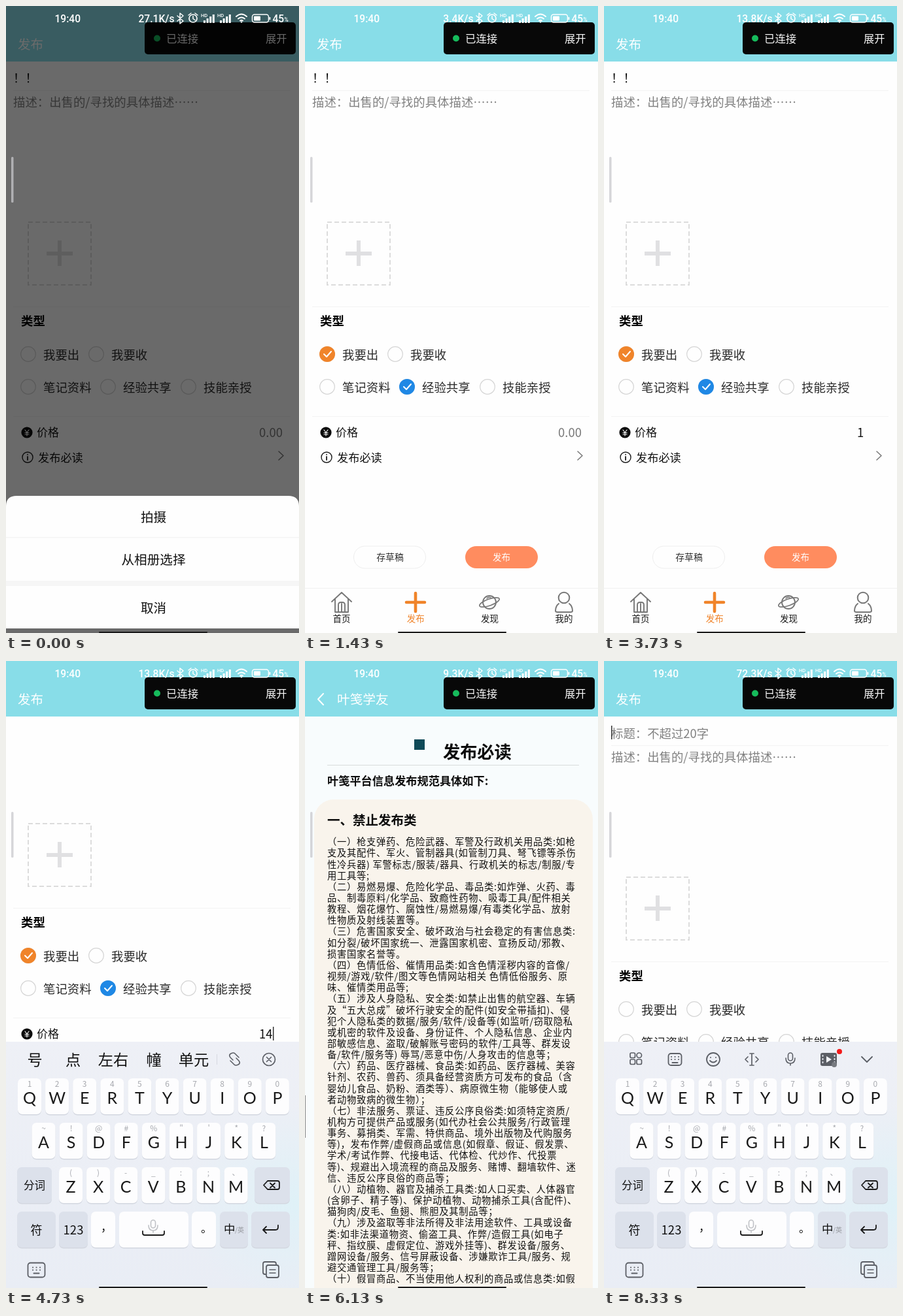
These frames come from a looping animation (448x960 px, 8.36 s). An HTML page:

```html
<!DOCTYPE html>
<html lang="zh-CN">
<head>
<meta charset="utf-8">
<style>
html, body { margin: 0; width: 100%; height: 100%; overflow: hidden; background: #fefefe; }
svg { display: block; width: 100%; height: 100%; font-family: "Noto Sans CJK SC", "Noto Sans CJK", sans-serif; }
text { white-space: pre; }
.line { fill: none; stroke-linecap: round; stroke-linejoin: round; }
.status text { font-family: Roboto, sans-serif; font-weight: 500; }
.letter { font-family: Lato, sans-serif; }
</style>
</head>
<body>
<svg id="stage" viewBox="0 0 448 960" lang="zh-CN"></svg>
<script>
const LOOP = 8360, PAPER = '#fefefe', CYAN = '#88dde8', ORANGE = '#f0842a', GRAY = '#777', HINT = '#808080', DARK = '#1a1a1a';

// Drawing helpers; text is placed by its vertical centre
const text = (s, x, cy, size, fill = '#111', more = '') =>
  `<text x="${x}" y="${(cy + size * .37).toFixed(2)}" font-size="${size}" fill="${fill}" ${more}>${s}</text>`;
const mid = (s, x, cy, size, fill, more = '') => text(s, x, cy, size, fill, 'text-anchor="middle" ' + more);
const rect = (x, y, w, h, fill, r = 0, more = '') =>
  `<rect x="${x}" y="${y}" width="${w}" height="${h}" rx="${r}" fill="${fill}" ${more}/>`;
const disc = (x, y, r, fill, more = '') => `<circle cx="${x}" cy="${y}" r="${r}" fill="${fill}" ${more}/>`;
const ring = (x, y, r, stroke, w = 1.6) => disc(x, y, r, 'none', `stroke="${stroke}" stroke-width="${w}"`);
const path = (d, stroke, w = 1.6, more = '') => `<path class="line" d="${d}" stroke="${stroke}" stroke-width="${w}" ${more}/>`;
const group = (id, body, more = '') => `<g id="${id}" ${more}>${body}</g>`;
const bold = 'font-weight="700"';

const radio = (x, y, label) => ring(x, y, 11.3, '#d4d4d4', 1.2) + text(label, x + 23, y + 1, 18.4, '#2a2a2a');
const tick = (id, x, y, fill) => group(id, disc(x, y, 12, fill) + path(`M${x - 5} ${y}l4 4 7-8`, '#fff', 2));
const rule = y => rect(11, y, 424, 1, '#f3f3f3');

function form() {
  return group('heading', text('！！', 11, 110, 18.4)) +
    group('blank', text('标题：不超过20字', 11, 111, 18.4, HINT)) +
    rect(11, 99, 1.5, 21, '#333', 0, 'id="titleCaret"') + rule(129) +
    text('描述：出售的/寻找的具体描述……', 11, 147, 18.4, HINT) +
    rect(34, 331, 96, 96, 'none', 0, 'stroke="#dcdcdc" stroke-width="2" stroke-dasharray="7 4"') +
    rect(62, 376, 40, 6, '#e0e0e2') + rect(79, 359, 6, 39, '#e0e0e2') + rule(460) +
    text('类型', 23, 482, 18.4, '#000', bold) +
    radio(34, 533, '我要出') + radio(138, 533, '我要收') +
    radio(34, 583, '笔记资料') + radio(156, 583, '经验共享') + radio(279, 583, '技能亲授') +
    tick('sell', 34, 533, ORANGE) + tick('share', 156, 583, '#1f88e5') + rule(628) +
    disc(32, 653, 8.6, '#0c0c0c') + path('M29 649l3 4 3-4M32 653v5M29 653.5h6M29 656h6', '#fff', 1.1) +
    text('价格', 47, 653, 17) + text('0.00', 387, 653, 18.5, GRAY, 'id="price"') +
    rect(408, 642, 1.5, 21, '#333', 0, 'id="priceCaret"') +
    ring(33, 691, 8, DARK, 1.4) + path('M33 690v5M33 686.6v.2', DARK, 1.8) +
    text('发布必读', 49, 692, 17.2) + path('M417 682l7 6.5-7 6.5', GRAY, 1.5) +
    rect(74.5, 827, 110, 34, PAPER, 17, 'stroke="#eee"') + mid('存草稿', 130, 844, 13.9, '#333') +
    rect(245, 827, 111, 34, '#ff8c5f', 17) + mid('发布', 300.5, 844, 13.5, '#fff');
}

function tabs() {
  return rect(0, 891, 448, 69, PAPER) + rect(0, 891, 448, 1, '#f0f0f0') +
    path('M41 912l15-14 15 14M46 908v20h20v-20M51 928v-11q0-4 4-4h2q4 0 4 4v11M56 915v13', GRAY, 1.9) +
    path('M169 899v28M155 913h28', ORANGE, 4.6) +
    ring(282, 913, 10, GRAY, 1.9) +
    `<ellipse cx="282" cy="913" rx="16" ry="5" transform="rotate(-20 282 913)" fill="none" stroke="${GRAY}" stroke-width="1.7"/>` +
    path('M278 907q3-3 6-1', GRAY, 1.4) +
    ring(396, 906, 8.3, GRAY, 2) + path('M388 915q-5 4-5 11 0 2 3 2h20q3 0 3-2 0-7-5-11', GRAY, 2) +
    ['首页', '发布', '发现', '我的'].map((s, i) => mid(s, 56 + i * 113.3, 938, 13.5, i === 1 ? ORANGE : DARK)).join('');
}

function keyboard() {
  const ink = '#5c5f66';
  const key = (x, y, w, special) => rect(x, y + 1.5, w, 55, '#d3d7e0', 7) + rect(x, y, w, 55, special ? '#dce1eb' : '#fdfdfe', 7);
  const row = (letters, hints, x, y) => [...letters].map((c, i) => {
    const cx = x + i * 42.1;
    return key(cx - 18, y, 36) + mid(hints[i], cx, y + 9, 12, '#a6a8ae') + mid(c, cx, y + 30, 25, DARK, 'class="letter"');
  }).join('');
  const mic = (x, y, c) => rect(x - 3.5, y - 9, 7, 12, 'none', 3.5, `stroke="${c}" stroke-width="1.6"`) +
    path(`M${x - 7} ${y - 1}q0 8 7 8t7-8M${x} ${y + 7}v3`, c);
  const board = (x, y, w, h) => rect(x - w / 2, y - h / 2, w, h, 'none', 4, `stroke="${ink}" stroke-width="1.8"`) +
    path(`M${x - 5.5} ${y - 4}h.1M${x} ${y - 4}h.1M${x + 5.5} ${y - 4}h.1M${x - 5.5} ${y}h.1M${x} ${y}h.1M${x + 5.5} ${y}h.1M${x - 4} ${y + 5}h8`, ink, 2);
  const tools = [[41, 601], [51, 601], [41, 611], [51, 611]].map(([x, y], i) =>
      rect(x - 1, y - 1, 7.5, 7.5, 'none', i === 1 ? 3.7 : 2, `stroke="${ink}" stroke-width="1.7"`)).join('') +
    board(108.5, 610, 20, 18) + ring(167, 610, 10, ink, 1.8) + path('M163 607v.2M171 607v.2M162 612q5 5 10 0', ink, 1.8) +
    path('M226 602v16M223 601h6M223 619h6M220 606l-4 4 4 4M232 606l4 4-4 4', ink, 1.7) +
    mic(285, 609, ink) + rect(331, 600, 25, 20, ink, 3) + path('M334.5 604v12M352.5 604v12', '#e6e9f0', 2, 'stroke-dasharray="1 4"') +
    '<path d="M340 605v10l8-5z" fill="#f2f4f8"/>' + disc(352, 618, 4, '#777a80') + disc(360, 598, 4, '#f31a1a') +
    path('M394 606l8 8 8-8', ink, 1.8);
  const words = [['号', 44], ['点', 102.5], ['左右', 164], ['幢', 226], ['单元', 287]].map(([s, x]) => mid(s, x, 610, 23.2)).join('') +
    rect(322, 602, 1, 16, '#d6d9e0') + path('M347 611l-4-4q-3-4 1-6t6 0l6 6M352 608l4 4q3 4-1 6t-6 0l-6-6', ink, 1.6) +
    ring(402, 610, 9.5, ink, 1.7) + path('M398.5 606.5l7 7M405.5 606.5l-7 7', ink, 1.6);
  return rect(0, 583, 448, 377, 'url(#keys)') + rect(0, 583, 448, 377, 'url(#glow)') +
    group('tools', tools) + group('words', words) +
    row('QWERTYUIOP', '1234567890', 36, 639) + row('ASDFGHJKL', '~!@#%"\'*?', 57.5, 707) + row('ZXCVBNM', '()-_:;、', 99, 775) +
    key(17, 775, 53, 1) + mid('分词', 43.5, 803, 16.5) + key(380, 775, 54, 1) +
    path('M400 796h15q3 0 3 3v7q0 3-3 3h-15l-6-6.5zM404 799.5l7 7M411 799.5l-7 7', DARK, 1.8) +
    key(17, 843, 59, 1) + mid('符', 46.5, 871, 18) + key(81, 843, 44, 1) + mid('123', 103, 871, 18.5) +
    key(130, 843, 37) + text('，', 145, 867, 17) + key(173, 843, 106) + mic(225, 865, '#c0c2c6') +
    path('M209 873v3q0 3 3 3h27q3 0 3-3v-3', DARK, 1.8) +
    key(284, 843, 37) + text('。', 298, 869, 17) + key(327, 843, 43, 1) + text('中', 333, 870, 17.5) + text('/英', 350, 871, 10, '#95989e') +
    key(375, 843, 59, 1) + path('M416 864v3q0 4-4 4h-18M398 866l-5 5 5 5', DARK, 1.8) +
    board(46.5, 932.5, 26, 22) +
    path('M397 939h-1q-3 0-3-3v-13q0-3 3-3h14q3 0 3 3v1', ink, 1.8) +
    rect(398, 925, 19, 19, 'none', 3, `stroke="${ink}" stroke-width="1.8"`) + path('M403 932h9M403 937h9', ink, 1.6);
}

const ARTICLE = `（一）枪支弹药、危险武器、军警及行政机关用品类:如枪
支及其配件、军火、管制器具(如管制刀具、弩飞镖等杀伤
性冷兵器) 军警标志/服装/器具、行政机关的标志/制服/专
用工具等;
（二）易燃易爆、危险化学品、毒品类:如炸弹、火药、毒
品、制毒原料/化学品、致瘾性药物、吸毒工具/配件相关
教程、烟花爆竹、腐蚀性/易燃易爆/有毒类化学品、放射
性物质及射线装置等。
（三）危害国家安全、破坏政治与社会稳定的有害信息类:
如分裂/破坏国家统一、泄露国家机密、宣扬反动/邪教、
损害国家名誉等。
（四）色情低俗、催情用品类:如含色情淫秽内容的音像/
视频/游戏/软件/图文等色情网站相关 色情低俗服务、原
味、催情类用品等;
（五）涉及人身隐私、安全类:如禁止出售的航空器、车辆
及“五大总成”破坏行驶安全的配件(如安全带插扣)、侵
犯个人隐私类的数据/服务/软件/设备等(如监听/窃取隐私
或机密的软件及设备、身份证件、个人隐私信息、企业内
部敏感信息、盗取/破解账号密码的软件/工具等、群发设
备/软件/服务等) 辱骂/恶意中伤/人身攻击的信息等；
（六）药品、医疗器械、食品类:如药品、医疗器械、美容
针剂、农药、兽药、须具备经营资质方可发布的食品（含
婴幼儿食品、奶粉、酒类等）、病原微生物（能够使人或
者动物致病的微生物）；
（七）非法服务、票证、违反公序良俗类:如须特定资质/
机构方可提供产品或服务(如代办社会公共服务/行政管理
事务、募捐类、军需、特供商品、境外出版物及代购服务
等)，发布作弊/虚假商品或信息(如假章、假证、假发票、
学术/考试作弊、代接电话、代体检、代炒作、代投票
等)、规避出入境流程的商品及服务、赌博、翻墙软件、迷
信、违反公序良俗的商品等；
（八）动植物、器官及捕杀工具类:如人口买卖、人体器官
(含卵子、精子等)、保护动植物、动物捕杀工具(含配件)、
猫狗肉/皮毛、鱼翅、熊胆及其制品等；
（九）涉及盗取等非法所得及非法用途软件、工具或设备
类:如非法渠道物资、偷盗工具、作弊/造假工具(如电子
秤、指纹膜、虚假定位、游戏外挂等)、群发设备/服务、
蹭网设备/服务、信号屏蔽设备、涉嫌欺诈工具/服务、规
避交通管理工具/服务等；
（十）假冒商品、不当使用他人权利的商品或信息类:如假`;

function rules() {
  return rect(0, 0, 448, 960, '#f8fcfd') + rect(0, 0, 448, 85, CYAN) +
    path('M28 50l-8 8.5 8 8.5', '#fff', 2) + text('叶笺学友', 49, 59, 19.7, '#fff') +
    rect(167, 120, 16, 16, '#0f4a58') + text('发布必读', 211, 139, 26.2, '#0c0c0c', bold) + rect(34, 159, 385, 1, '#d9dcdc') +
    text('叶笺平台信息发布规范具体如下:', 34, 184, 17.2, '#0c0c0c', bold) +
    rect(14, 212, 426, 800, '#f9f4ec', 30) + text('一、禁止发布类', 34, 244, 19.5, '#0c0c0c', bold) +
    ARTICLE.split('\n').map((s, i) => text(s, 34, 277 + i * 17.15, 14.3, '#111', 'letter-spacing=".7"')).join('') +
    rect(0, 665, 1, 65, '#888');
}

function sheet() {
  return '<path d="M0 953V766q0-16 16-16h416q16 0 16 16v187z" fill="#fefefe"/>' +
    rect(0, 813, 448, 1.5, '#f5f5f5') + rect(0, 880, 448, 8, '#f6f6f6') +
    mid('拍摄', 225.5, 783, 19.6) + mid('从相册选择', 225.5, 848, 19.6) + mid('取消', 225.5, 922, 19.6);
}

function status() {
  const w = '#fff';
  const bars = x => [4, 7, 10, 13].map((h, i) => rect(x + i * 4.6, 26 - h, 3, h, w)).join('') + text('HD', x - 4, 14, 7.5, w);
  return text('19:40', 74.5, 19, 15.6, w) + text('', 257.5, 19, 15.6, w, 'text-anchor="end" id="speed"') +
    path('M262 15l9 8-5 4V11l5 4-9 8', w, 1.5) +
    ring(286, 19, 6, w, 1.7) + path('M286 15.5v4l3 2M279 14l4-3M293 14l-4-3', w, 1.5) +
    bars(302) + bars(327) +
    path('M352 16q8-7 16 0M355 19.5q5-4 10 0M358 22.5q2-1.5 4 0', w, 2) + disc(360, 24.5, 1.2, w) +
    rect(376.5, 13, 25, 12, 'none', 3.5, `stroke="${w}" stroke-width="1.5"`) + rect(379, 15.5, 10, 7, w, 1) + rect(402.5, 17, 1.8, 4, w) +
    text('45', 407.5, 19, 15.6, w) + text('%', 425.5, 21, 8.5, w);
}

const popup = rect(212, 25, 231, 49, '#080808', 5) + disc(231, 49.5, 5, '#16bb5c') +
  text('已连接', 245, 50, 16.4, '#f8f8f8') + text('展开', 397, 50, 16.3, '#f8f8f8');

stage.innerHTML = `<defs>
  <linearGradient id="keys" x2="0" y2="1"><stop stop-color="#eef0f6"/><stop offset="1" stop-color="#e9edf5"/></linearGradient>
  <radialGradient id="glow" cx="1" cy=".66" r=".4"><stop stop-color="#dcf2f8" stop-opacity=".8"/><stop offset="1" stop-color="#dcf2f8" stop-opacity="0"/></radialGradient>
  </defs>` + rect(0, 0, 448, 960, PAPER) + group('form', form()) + tabs() +
  rect(0, 0, 448, 85, CYAN) + text('发布', 18, 59, 19.5, '#fff') +
  group('keyboard', keyboard()) + group('rules', rules()) + popup +
  rect(0, 0, 448, 960, '#000', 0, 'id="dim"') + group('sheet', sheet()) +
  rect(8, 231, 3.5, 70, '#c8c8cc', 1.5, 'opacity=".75"') + group('status', status(), 'class="status"') +
  rect(142, 958, 166, 2, DARK, 1);

const el = id => document.getElementById(id);
const show = (id, on) => el(id).style.display = on ? '' : 'none';
const shift = (id, x, y) => el(id).setAttribute('transform', `translate(${x} ${y})`);
const ramp = (t, start, span = 240) => 1 - (1 - Math.min(1, Math.max(0, (t - start) / span))) ** 3;
const open = (t, from, to) => ramp(t, from) - ramp(t, to);
const within = (t, a, b) => t >= a && t < b;
const stepAt = (t, steps) => steps.filter(s => t >= s[0]).pop()[1];

const SPEEDS = [[0, '27.1'], [650, '3.4'], [2100, '13.8'], [5300, '9.3'], [6650, '124'], [7750, '72.3']];
const PRICES = [[0, '0.00'], [2800, '1'], [4400, '14'], [7700, '0.00']];

function draw() {
  const t = performance.now() % LOOP;
  const priceKeys = open(t, 2000, 3300) + open(t, 3950, 5050);
  const keys = priceKeys + ramp(t, 7900);
  const sheetUp = 1 - ramp(t, 400);
  const reset = t >= 7700;
  const price = stepAt(t, PRICES), typed = price !== '0.00';

  shift('form', 0, -82 * priceKeys);
  shift('keyboard', 0, 380 * (1 - keys));
  shift('rules', 448 * (1 - open(t, 5500, 6750)), 0);
  shift('sheet', 0, 210 * (1 - sheetUp));
  el('dim').setAttribute('opacity', .58 * sheetUp);

  show('heading', !reset);
  show('blank', reset);
  show('titleCaret', t >= 7900);
  show('sell', within(t, 850, 7700));
  show('share', within(t, 1150, 7700));
  const words = within(t, 2800, 3600) || within(t, 4400, 5400);
  show('words', words);
  show('tools', !words);

  el('price').textContent = price;
  el('price').setAttribute('fill', typed ? '#111' : GRAY);
  show('priceCaret', within(t, 2000, 3300) || within(t, 3950, 5050));
  el('priceCaret').setAttribute('x', 387 + (typed ? price.length * 10.5 : 0));
  el('speed').textContent = stepAt(t, SPEEDS) + 'K/s';
  requestAnimationFrame(draw);
}
draw();
</script>
</body>
</html>
```
